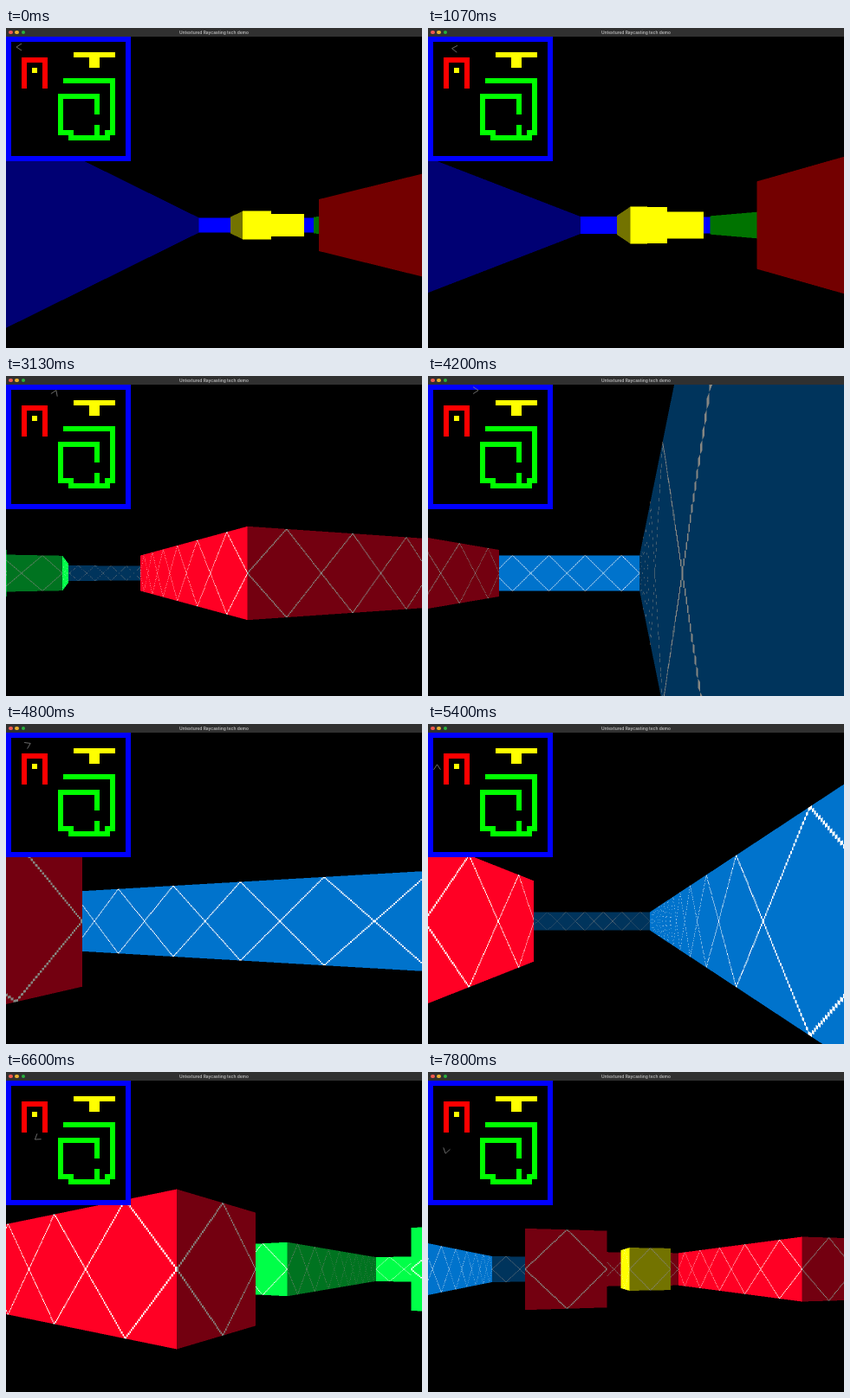
Write an HTML page with a canvas that moves like this. It is 480 by 370 pixels and loops after 8.14 s.

```html
<!DOCTYPE html>
<html lang="en">
<head>
<meta charset="utf-8">
<title>Untextured Raycasting tech demo</title>
<style>
  html, body { margin: 0; width: 100%; height: 100%; overflow: hidden; background: #000; }
  #stage { position: relative; width: 480px; height: 370px; overflow: hidden; background: #000; }
  canvas { position: absolute; left: 0; top: 0; }
  #bar {
    position: absolute; left: 0; top: 0; width: 480px; height: 10px; background: #303030;
    color: #b8b8b8; font: 600 4.9px/10px Inter, Roboto, sans-serif; text-align: center; white-space: nowrap;
  }
  #bar i { position: absolute; top: 2.7px; width: 4.6px; height: 4.6px; border-radius: 50%; }
</style>
</head>
<body>
<div id="stage">
  <canvas id="view" width="480" height="370"></canvas>
  <div id="bar">
    <i style="left:3px;background:#f0584e"></i>
    <i style="left:10.4px;background:#e8b02c"></i>
    <i style="left:17.8px;background:#28b03c"></i>
    Untextured Raycasting tech demo
  </div>
</div>
<script>
const LOOP = 8140, STEP = 1000 / 15, TEXTURED_FROM = 1600;
const SIZE = 24, CELL = 6, BAR = 10, FOV = 0.66, TEX = 64;
const W = 960, H = 720, HORIZON = 436; // 3D view, drawn at double size

// Map: colour index, then column, row, width, height
const BLUE = 1, RED = 2, GREEN = 3, YELLOW = 4;
const blocks = [
  [BLUE, 0, 0, 24, 1], [BLUE, 0, 23, 24, 1], [BLUE, 0, 0, 1, 24], [BLUE, 23, 0, 1, 24],
  [RED, 3, 4, 5, 1], [RED, 3, 4, 1, 6], [RED, 7, 4, 1, 6],
  [YELLOW, 5, 6, 1, 1], [YELLOW, 13, 3, 8, 1], [YELLOW, 16, 4, 2, 2],
  [GREEN, 11, 8, 10, 1], [GREEN, 20, 8, 1, 11], [GREEN, 19, 18, 2, 1],
  [GREEN, 12, 19, 8, 1], [GREEN, 10, 18, 3, 1], [GREEN, 10, 11, 1, 8],
  [GREEN, 10, 11, 8, 1], [GREEN, 17, 11, 1, 4], [GREEN, 17, 17, 1, 2]
];
const grid = new Uint8Array(SIZE * SIZE);
for (const [c, x, y, w, h] of blocks)
  for (let j = y; j < y + h; j++) grid.fill(c, j * SIZE + x, j * SIZE + x + w);

const rgb = (r, g, b) => (255 << 24 | b << 16 | g << 8 | r) >>> 0;
const shades = list => list.map(c => [rgb(...c), rgb(...c.map(v => Math.round(v * 0.45)))]);
const plain = shades([[0, 0, 0], [0, 0, 255], [255, 0, 0], [0, 255, 0], [255, 255, 0]]);
const tinted = shades([[0, 0, 0], [0, 115, 204], [255, 0, 36], [0, 255, 72], [255, 255, 0]]);
const lineShade = [rgb(255, 255, 255), rgb(134, 134, 130)];
const BLACK = rgb(0, 0, 0);
const mapColors = ['#000', '#00f', '#f00', '#0f0', '#ff0'];

// Camera path: time, x, y, heading in degrees (clockwise from east)
const path = [
  [0, 2, 2, 0], [333, 2, 2, 6], [400, 2, 2, 6],
  [1333, 5.65, 2.38, 6], [1533, 5.65, 2.38, 6],
  [1733, 6.45, 2.46, 6], [2067, 7.75, 2.88, 30],
  [2600, 8.78, 1.1, 29.5], [2800, 9.4, 1.1, 62], [3133, 9.66, 1.1, 113.7],
  [3733, 9.66, 1.1, 146], [3800, 9.66, 1.1, 146], [4200, 9.68, 1.1, 180],
  [4600, 6.4, 1.4, 168], [4930, 3.6, 2.5, 145], [5200, 2.1, 4.3, 112],
  [5400, 1.75, 6.14, 90], [5730, 1.75, 8.6, 70], [6030, 2.5, 10.9, 30],
  [6320, 4.1, 11.8, -5], [6600, 5.57, 11.34, -36.4],
  [7800, 3.36, 14.03, -75.7], [LOOP, 3.36, 14.03, -75.7]
];

function cameraAt(t) {
  let i = 1;
  while (i < path.length - 1 && path[i][0] < t) i++;
  const a = path[i - 1], b = path[i];
  const f = Math.min(1, Math.max(0, (t - a[0]) / (b[0] - a[0])));
  const [, x, y, deg] = a.map((v, n) => v + (b[n] - v) * f);
  const r = deg * Math.PI / 180;
  return { x, y, dx: Math.cos(r), dy: Math.sin(r) };
}

const ctx = document.getElementById('view').getContext('2d');
const buffer = document.createElement('canvas');
buffer.width = W;
buffer.height = H;
const bufCtx = buffer.getContext('2d');
const image = bufCtx.createImageData(W, H);
const pixels = new Uint32Array(image.data.buffer);

function castRay(cam, rx, ry) {
  let mx = Math.floor(cam.x), my = Math.floor(cam.y), side = 0;
  const stepX = rx < 0 ? -1 : 1, stepY = ry < 0 ? -1 : 1;
  const gapX = Math.abs(1 / rx), gapY = Math.abs(1 / ry);
  let nextX = (rx < 0 ? cam.x - mx : mx + 1 - cam.x) * gapX;
  let nextY = (ry < 0 ? cam.y - my : my + 1 - cam.y) * gapY;
  do {
    if (nextX < nextY) { nextX += gapX; mx += stepX; side = 0; }
    else { nextY += gapY; my += stepY; side = 1; }
  } while (!grid[my * SIZE + mx]);
  const dist = side ? nextY - gapY : nextX - gapX;
  const hit = side ? cam.x + dist * rx : cam.y + dist * ry;
  return { dist, side, u: hit - Math.floor(hit), kind: grid[my * SIZE + mx] };
}

function drawWalls(cam, textured) {
  pixels.fill(BLACK);
  const palette = textured ? tinted : plain, mid = (TEX - 1) / 2;
  for (let c = 0; c < W; c++) {
    const k = FOV * ((c + 0.5) * 2 / W - 1);
    const { dist, side, u, kind } = castRay(cam, cam.dx - cam.dy * k, cam.dy + cam.dx * k);
    const half = H / 2 / dist, top = HORIZON - half;
    const from = Math.max(0, Math.round(top));
    const to = Math.min(H, Math.round(HORIZON + half));
    const fill = palette[kind][side], line = lineShade[side];
    const reach = TEX / 2 - Math.abs(Math.floor(u * TEX) - mid);
    const scale = TEX / (2 * half);
    for (let y = from; y < to; y++) {
      const row = Math.floor((y + 0.5 - top) * scale);
      // One diamond outline on each wall cell
      pixels[y * W + c] = textured && Math.abs(row - mid) === reach ? line : fill;
    }
  }
  bufCtx.putImageData(image, 0, 0);
  ctx.drawImage(buffer, 0, BAR, W / 2, H / 2);
}

function drawMap(cam) {
  ctx.fillStyle = '#000';
  ctx.fillRect(0, BAR, SIZE * CELL, SIZE * CELL);
  for (const [c, x, y, w, h] of blocks) {
    ctx.fillStyle = mapColors[c];
    ctx.fillRect(x * CELL, BAR + y * CELL, w * CELL, h * CELL);
  }
  const tip = k => ctx.lineTo(
    (cam.x + cam.dx - cam.dy * k) * CELL,
    BAR + (cam.y + cam.dy + cam.dx * k) * CELL);
  ctx.strokeStyle = '#848484';
  ctx.lineWidth = 0.8;
  ctx.beginPath();
  tip(-FOV);
  ctx.lineTo(cam.x * CELL, BAR + cam.y * CELL);
  tip(FOV);
  ctx.stroke();
}

let shown = -1;
function tick() {
  const tickNo = Math.floor((performance.now() % LOOP + 3.5) / STEP);
  if (tickNo !== shown) {
    shown = tickNo;
    const t = Math.min(tickNo * STEP, LOOP);
    const cam = cameraAt(t);
    drawWalls(cam, t > TEXTURED_FROM - 1);
    drawMap(cam);
  }
  requestAnimationFrame(tick);
}
tick();
</script>
</body>
</html>
```
